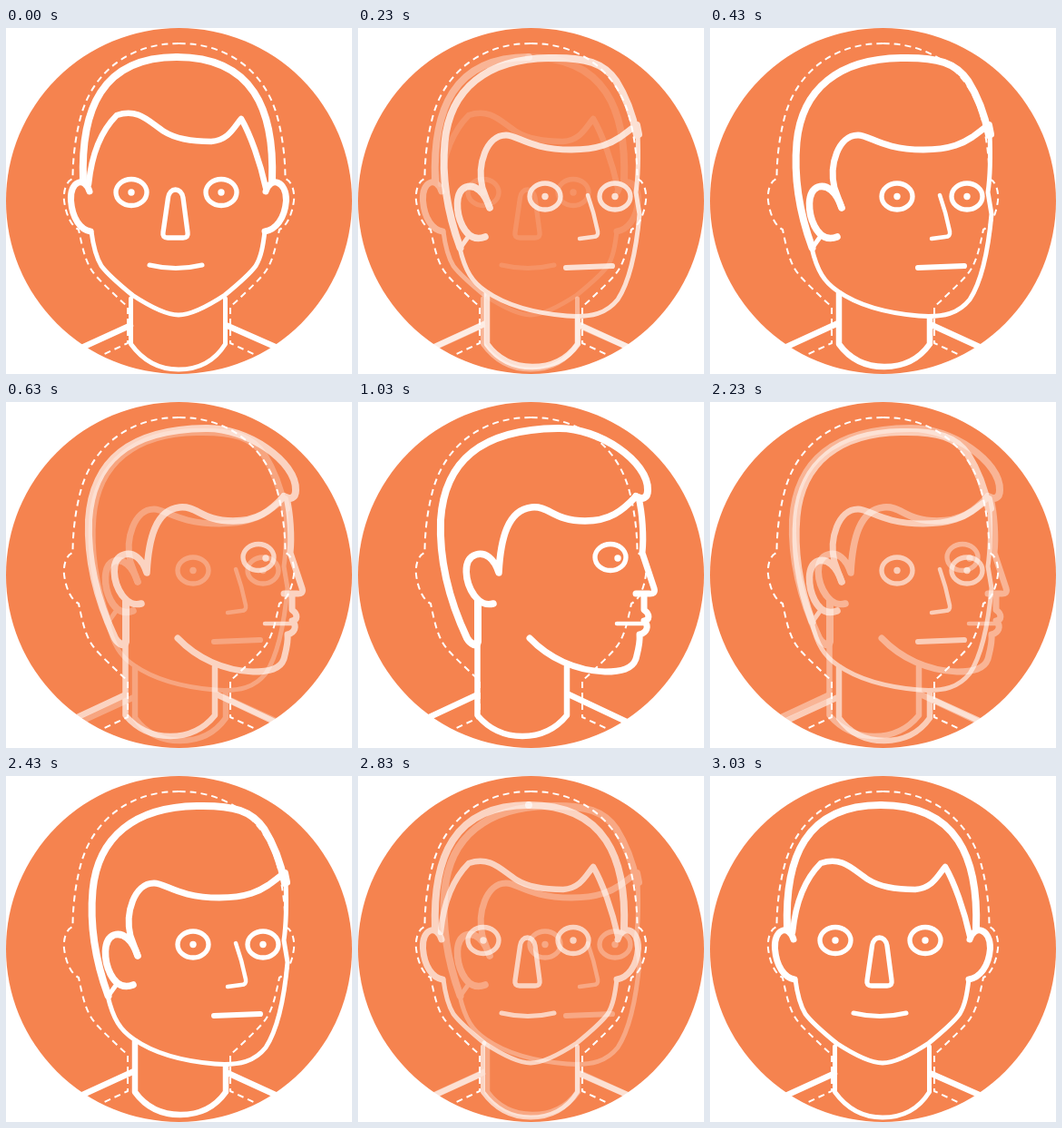
Write an HTML page with a canvas that moves like this. It is 381 by 381 pixels and loops after 4.03 s.

```html
<!DOCTYPE html>
<html lang="en">
<head>
<meta charset="utf-8">
<title>Turning head</title>
<style>
html, body { margin: 0; width: 100%; height: 100%; overflow: hidden; background: #fff; }
canvas { display: block; }
</style>
</head>
<body>
<canvas id="stage" width="381" height="381"></canvas>
<script>
const SIZE = 381, LOOP = 4030, ORANGE = '#f5834f';
const ctx = document.getElementById('stage').getContext('2d');

function layer(draw) {
  const c = document.createElement('canvas');
  c.width = c.height = SIZE;
  const g = c.getContext('2d');
  g.strokeStyle = g.fillStyle = '#fff';
  g.lineCap = g.lineJoin = 'round';
  draw(g);
  return c;
}

function line(g, width, d) {
  g.lineWidth = width;
  g.stroke(new Path2D(d));
}

function eye(g, x, y, px = x, py = y) {
  g.lineWidth = 5.3;
  g.beginPath();
  g.ellipse(x, y, 17, 14.5, 0, 0, Math.PI * 2);
  g.stroke();
  g.beginPath();
  g.arc(px, py, 3.7, 0, Math.PI * 2);
  g.fill();
}

const backdrop = layer(g => {
  g.fillStyle = ORANGE;
  g.beginPath();
  g.arc(190.5, 190.5, 190.5, 0, Math.PI * 2);
  g.fill();
  // Dashed silhouette, one half mirrored about the middle
  const half = 'M190.5 17 C136 17 97 48 83 95 C76 120 73.5 145 73.5 166 ' +
    'C66 169 63 180 64 190 C66 206 72 218 80 222 C85 246 88 260 99 273 ' +
    'C108 283 122 296 134 307 V347 L104 361';
  g.lineCap = 'butt';
  g.setLineDash([7, 5]);
  line(g, 2, half);
  g.translate(381, 0);
  g.scale(-1, 1);
  line(g, 2, half);
});

// Back of the front pose: lingers while the head turns away
const frontBack = layer(g => {
  line(g, 8, 'M85 169 C82 90 105 32 188 32');
  line(g, 7, 'M92 180 C87 163 70 168 71.5 190 C73 210 82 222 93 224');
  line(g, 5, 'M94 224 C96 240 99 252 105 262 C111 270 128 285 139 294');
  line(g, 5, 'M137.5 298 V348 C152 368 170 376 190 376 C211 376 229 368 241.5 348 V298');
  line(g, 6.5, 'M137 327.5 L80 353.5 M243 327.5 L302 353.5');
});

const frontFace = layer(g => {
  line(g, 8, 'M188 32 C272 32 296 90 293 169');
  line(g, 7, 'M286 180 C291 163 309 168 308.5 190 C307 210 297 222 285 224');
  line(g, 5, 'M139 294 C162 309 178 316 190 316 C202 316 218 309 241 294 ' +
    'C252 285 269 270 275 262 C281 252 283 240 285 224');
  line(g, 6.5, 'M91 172 C94 142 104 114 122 96 C146 88 157 103 174 114 ' +
    'C190 124 210 125 226 125 C246 123 251 109 259 100 C269 117 280 148 286 176');
  eye(g, 138, 181);
  eye(g, 237, 181);
  line(g, 5.3, 'M178.5 187 C180 175 193 175 195 187 L200 225 Q201 231 195 231 ' +
    'H178 Q172 231 173 225 Z');
  line(g, 5, 'M158 261 Q187 268 216 261');
});

const turned = layer(g => {
  line(g, 8, 'M112.5 242 C99 205 92 165 95.5 126 C101 67 142 34 210 33 ' +
    'C252 32 271 39 284 58 C296 77 303 98 307 118');
  line(g, 5, 'M112 242 C118 268 126 280 141 290 C164 306 195 314 230 317 ' +
    'C258 319 274 314 286 299 C301 276 307 238 310 205 L306 181 C309 160 309 140 308 116');
  line(g, 8, 'M307 107 L309 117');
  line(g, 7, 'M145 198 L137 176 C131 151 141 118 163 118 C176 118 190 134 235 134 ' +
    'C266 134 280 126 289 120 C296 115 301 111 306 107');
  line(g, 7.5, 'M145 198 C139 180 129 172 119 175 C106 180 108 204 115 218 ' +
    'C121 230 130 234 140 230');
  line(g, 5, 'M112 243 L122 229');
  eye(g, 206, 185.5);
  eye(g, 283, 185.5);
  line(g, 4.5, 'M253 184 C258 198 262 214 264 224 Q265 230 259 230 L244 232');
  line(g, 6, 'M229 264 L280 262');
  line(g, 6.5, 'M142 292 V348 C155 366 172 373 192 373 C213 373 230 365 242 348 V320');
  line(g, 6.5, 'M140 325.5 L80 353 M243 326.5 L302 353.5');
});

const profile = layer(g => {
  line(g, 8, 'M132 219 V264 C131 270 124 267 120 260 C104 226 89 183 91 130 ' +
    'C95 68 132 30 220 29 C266 28 320 66 319 97 C319 106 313 108 306 104');
  line(g, 7.5, 'M306 104 C291 120 277 131 250 131 C215 131 211 114 191 116 ' +
    'C165 119 157 150 155 188 C150 172 140 165 130 168 C114 173 118 199 128 213 ' +
    'C135 222 141 224 149 222');
  line(g, 7, 'M309 105 C313 122 315 148 313 166 L326 205 Q328 212 320 211 H306');
  line(g, 7, 'M315 213 L315 229 C322 234 321 240 315 241 C321 247 318 254 310 256 ' +
    'C311 265 308 275 306 283 C302 294 290 297 272 297 C240 296 210 282 189 260');
  eye(g, 278, 171, 286, 172);
  line(g, 4.5, 'M285 244 H318');
  line(g, 6.5, 'M131.5 222 V345 C145 361 162 368 181 368 C201 368 217 361 230 345 V291');
  line(g, 6.5, 'M130 323 L70 351 M232 322 L302 355');
});

const layers = [frontBack, frontFace, turned, profile];

// start time, then opacity of each layer
const steps = [
  [0, 1, 1, 0, 0],
  [30, .4, .4, .5, 0],
  [230, .4, .13, .75, 0],
  [430, 0, 0, 1, 0],
  [630, 0, 0, .28, .65],
  [830, 0, 0, .1, .85],
  [1030, 0, 0, 0, 1],
  [2030, 0, 0, .13, .78],
  [2230, 0, 0, .6, .4],
  [2430, 0, 0, 1, 0],
  [2630, .2, .2, .75, 0],
  [2830, .65, .65, .3, 0],
  [3030, 1, 1, 0, 0]
];

const begin = performance.now();

function render() {
  const t = Math.max(0, performance.now() - begin) % LOOP;
  const mix = steps.filter(s => s[0] <= t).pop();
  ctx.globalAlpha = 1;
  ctx.fillStyle = '#fff';
  ctx.fillRect(0, 0, SIZE, SIZE);
  ctx.drawImage(backdrop, 0, 0);
  layers.forEach((img, i) => {
    ctx.globalAlpha = mix[i + 1];
    ctx.drawImage(img, 0, 0);
  });
  requestAnimationFrame(render);
}
render();
</script>
</body>
</html>
```
